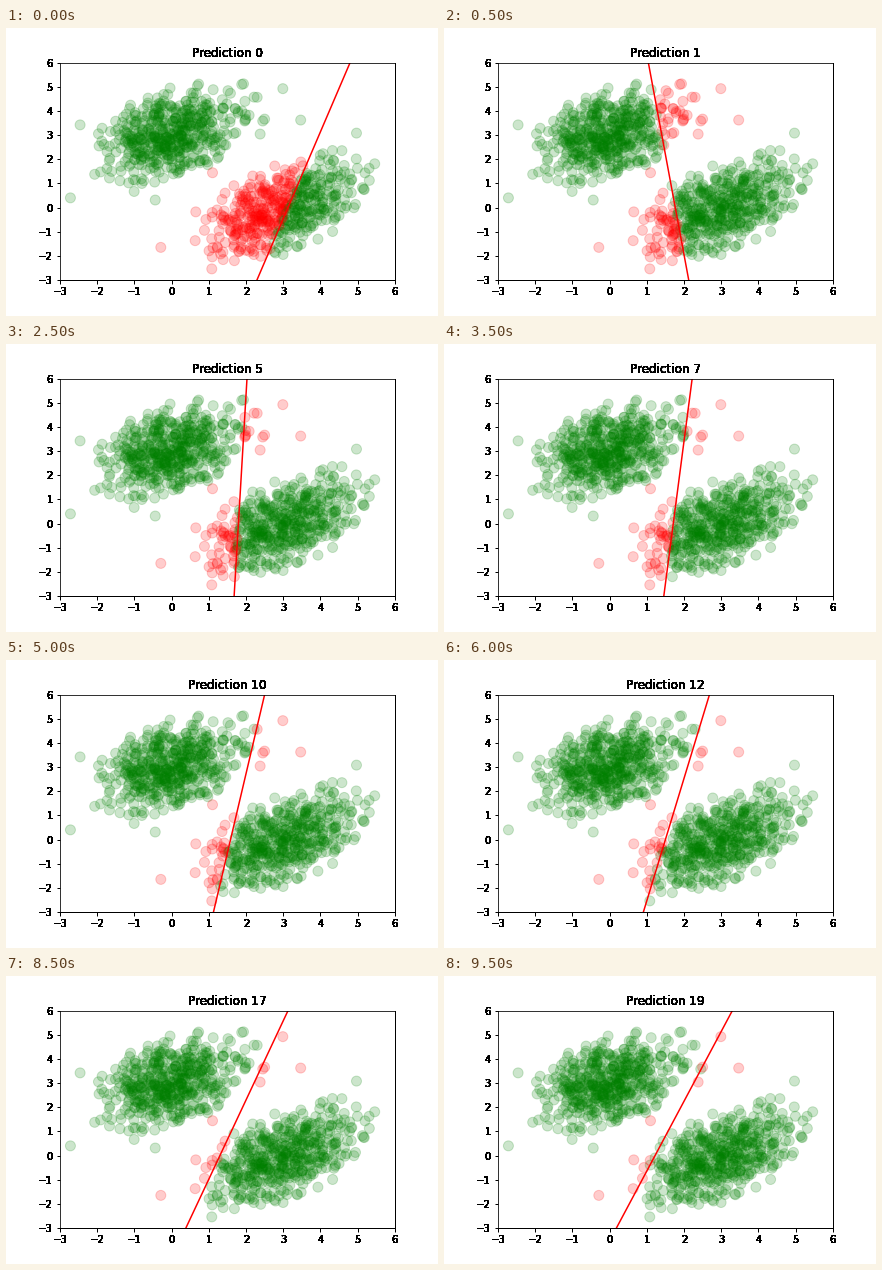
Recreate the animation shown at these times as a matplotlib script. Size 432 px wide and 288 px high, loop 10 s.

```python
import numpy as np
import matplotlib.pyplot as plt
from matplotlib.animation import FuncAnimation

STEPS, INTERVAL = 20, 500
PER_CLASS = 500
LOW, HIGH = -3, 6
COV = np.array([[1, 0.5], [0.5, 1]])
rng = np.random.default_rng(12)

# The few points that stand clear of each cloud.
UPPER_STRAYS = [(2.99, 4.92), (3.47, 3.62), (2.50, 3.66), (2.45, 3.58),
                (2.38, 3.04), (-0.44, 0.31), (-2.72, 0.40), (-2.46, 3.42)]
LOWER_STRAYS = [(-0.29, -1.65), (0.65, -0.18), (1.10, 1.44),
                (1.08, -2.54), (4.97, 3.08), (5.46, 1.81)]


def cloud(mean, strays, radius=2.4):
    """Correlated Gaussian cut at an ellipse, plus its stray points."""
    draws = rng.multivariate_normal(mean, COV, 2 * PER_CLASS)
    offset = draws - mean
    dist2 = np.sum(offset @ np.linalg.inv(COV) * offset, axis=1)
    core = draws[dist2 < radius ** 2][:PER_CLASS - len(strays)]
    return rng.permutation(np.vstack([core, strays]))


def boundary_x(step, y):
    """Decision line of a linear classifier during gradient descent.

    The weights approach (0.15, -0.15) in a slow mode and a fast,
    alternating one.
    """
    slow = 0.1747 * 0.955 ** step
    fast = -0.09 * (-0.27) ** step
    shift = slow + fast
    threshold = 3.74 * slow - 0.9 * fast
    return ((0.15 - shift) * y + threshold) / (0.15 + shift)


def thicken(text, passes=30):
    """Repeat the drawing so that the antialiased edges turn black."""
    draw_once = text.draw

    def draw(renderer):
        for _ in range(passes):
            draw_once(renderer)

    text.draw = draw


points = np.vstack([cloud([0, 3], UPPER_STRAYS), cloud([3, 0], LOWER_STRAYS)])
is_lower = np.arange(len(points)) >= PER_CLASS

plt.rcParams["font.family"] = "DejaVu Sans"
fig = plt.figure(figsize=(6, 4), dpi=72, facecolor="white")
ax = fig.add_axes([0.125, 0.125, 0.775, 0.755])
ticks = range(LOW, HIGH + 1)
ax.set(xlim=(LOW, HIGH), ylim=(LOW, HIGH), xticks=ticks, yticks=ticks)
ax.tick_params(width=1)
ax.spines[["right", "bottom"]].set_linewidth(1)
dots = ax.scatter(*points.T, s=100, c="green", alpha=0.2)
line, = ax.plot([], [], color="red", lw=1.5)
title = ax.set_title("Prediction 0")
for label in [title, *ax.get_xticklabels(), *ax.get_yticklabels()]:
    thicken(label)


def update(step):
    right_side = points[:, 0] > boundary_x(step, points[:, 1])
    correct = right_side == is_lower
    dots.set_facecolor(["green" if ok else "red" for ok in correct])
    ys = np.array([LOW - 1, HIGH + 1])
    line.set_data(boundary_x(step, ys), ys)
    title.set_text(f"Prediction {step}")
    return dots, line, title


anim = FuncAnimation(fig, update, frames=STEPS, interval=INTERVAL, repeat=True)
plt.show()
```
